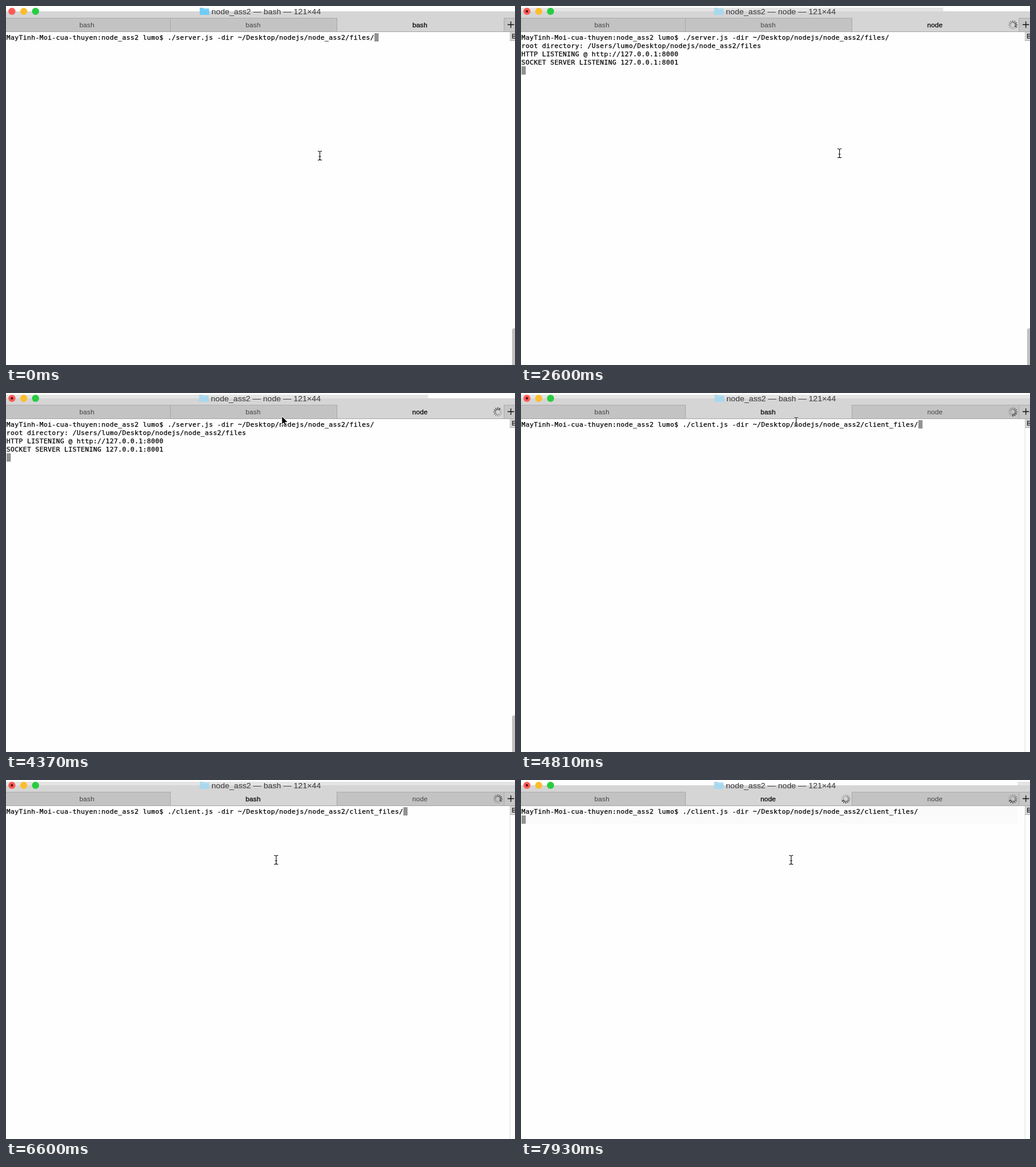
These frames come from a looping animation (862x607 px, 8000 ms). An HTML page:

```html
<!DOCTYPE html>
<html lang="en">
<head>
<meta charset="utf-8">
<title>Terminal</title>
<style>
  html, body { margin: 0; width: 100%; height: 100%; overflow: hidden; background: #fefefe; }
  svg { display: block; width: 862px; height: 607px; }
  text { white-space: pre; }
  .mono { font: 11px "DejaVu Sans Mono", monospace; letter-spacing: .378px; stroke: #000; stroke-width: .25px; }
  .title { font: 13.5px "Liberation Sans", Arial, sans-serif; letter-spacing: .1px; fill: #444; stroke: #444; stroke-width: .15px; }
  .tab { font: 11.5px "Liberation Sans", Arial, sans-serif; letter-spacing: .1px; text-anchor: middle; }
</style>
</head>
<body>
<svg id="stage" viewBox="0 0 862 607"></svg>
<script>
const LOOP = 8000, TICK = 148.3, START = 500;
const RUN_SERVER = 500, SERVER_TITLE = 650, SERVER_SPIN = 1100, SERVER_LOG = 1850;
const SWITCH = 4670, RUN_CLIENT = 7050, CLIENT_TITLE = 7200, CLIENT_SPIN = 7650;

const PROMPT = 'MayTinh-Moi-cua-thuyen:node_ass2 lumo$ ';
const SERVER_CMD = PROMPT + './server.js -dir ~/Desktop/nodejs/node_ass2/files/';
const CLIENT_CMD = PROMPT + './client.js -dir ~/Desktop/nodejs/node_ass2/client_files/';
const LOG = [
  'root directory: /Users/lumo/Desktop/nodejs/node_ass2/files',
  'HTTP LISTENING @ http://127.0.0.1:8000',
  'SOCKET SERVER LISTENING 127.0.0.1:8001'
];

// time, x, y of the pointer
const POINTER = [
  [2150, 531.5, 253], [2580, 539.5, 249], [3180, 541, 241.5],
  [3500, 538, 220], [4050, 480, 80], [4350, 467, 39],
  [4750, 467, 39], [5250, 457.5, 135]
];

const stage = document.getElementById('stage');

function add(tag, attrs, parent = stage) {
  const node = document.createElementNS('http://www.w3.org/2000/svg', tag);
  for (const key in attrs) node.setAttribute(key, attrs[key]);
  parent.appendChild(node);
  return node;
}
const rect = (x, y, width, height, fill, parent) => add('rect', { x, y, width, height, fill }, parent);
const set = (node, attrs) => { for (const key in attrs) node.setAttribute(key, attrs[key]); };
const show = (node, on) => node.setAttribute('visibility', on ? 'visible' : 'hidden');
const write = (node, text) => { if (node.textContent !== text) node.textContent = text; };
const move = (node, x, y) => node.setAttribute('transform', `translate(${x} ${y})`);

// Title bar
rect(0, 0, 862, 607, '#fefefe');
rect(0, 9, 862, 11, '#d5d5d5');
const sheen = rect(0, 3, 862, 6, '#e4e4e4');
['#fc5b55', '#fdbd2f', '#27cd41'].forEach((fill, i) =>
  add('circle', { cx: 10 + 20 * i, cy: 9, r: 6, fill }));
const busyDot = add('circle', { cx: 10, cy: 9, r: 2, fill: '#4a0808' });
const folder = add('g', {});
const folderBack = add('path', { d: 'M0 4V3.8Q0 3 .8 3H5.5L7 4.3H15.2Q16 4.3 16 5V14.4Q16 15 15.2 15H.8Q0 15 0 14.4Z' }, folder);
rect(0, 5.6, 16, .8, '#fff', folder).setAttribute('opacity', .25);
const title = add('text', { y: 14, class: 'title' });

// Tabs
const tabs = [[0, 278, 137], [279, 281, 418.5], [561, 282, 701]].map(([x, w, cx]) => ({
  bg: rect(x, 20, w, 23, '#c3c3c3'),
  edge: rect(x, 20, w, 1, '#acacac'),
  label: add('text', { x: cx, y: 36, class: 'tab' })
}));
rect(844, 20, 18, 23, '#c6c6c6');
rect(844, 20, 18, 1, '#acacac');
[278, 560, 843].forEach(x => rect(x, 20, 1, 23, '#a8a8a8'));
rect(0, 43, 862, 1, '#a6a6a6');
add('path', { d: 'M849.5 31.5H860.5M855 26V37', stroke: '#111', 'stroke-width': 1.3 });

function makeSpinner(x) {
  const group = add('g', { stroke: '#262626', 'stroke-width': 1.5, 'stroke-linecap': 'round' });
  move(group, x, 32);
  const spokes = Array.from({ length: 12 }, (_, i) =>
    add('path', { d: 'M0 -4V-7.2', transform: `rotate(${i * 30})` }, group));
  return { group, spokes };
}
const spinners = [makeSpinner(550), makeSpinner(833)];

// Terminal area
const band = rect(0, 44, 841, 30, '#fafafa');
const caret = rect(0, 0, 7, 14, '#929292');
const lines = [0, 1, 2, 3].map(i => add('text', { x: .7, y: 57 + 14 * i, class: 'mono' }));
const track = rect(853, 59, 1, 548, '#e2e2e2');
const thumb = add('rect', { x: 857, y: 545, width: 12, height: 70, rx: 3.5, fill: '#c1c1c1' });
rect(853, 44, 9, 15, '#d3d3d3');
rect(853, 58, 9, 1, '#b0b0b0');
add('path', { d: 'M863 47.7H857.7V54.3H863M858 51H863', fill: 'none', stroke: '#2b2b2b', 'stroke-width': 1.3 });

// Pointers
const beam = add('g', { fill: 'none' });
[['#fff', 2.6], ['#111', 1.1]].forEach(([stroke, width]) => add('path', {
  d: 'M-3.5 -7.5H-2Q0 -7.5 0 -5.5Q0 -7.5 2 -7.5H3.5M0 -5.5V5.5M-3.5 7.5H-2Q0 7.5 0 5.5Q0 7.5 2 7.5H3.5M-1.8 1.5H1.8',
  stroke, 'stroke-width': width
}, beam));
const arrow = add('path', {
  d: 'M0 0V14.5L3.3 11.4L5.7 16.8L8.2 15.7L5.9 10.5H10.5Z',
  fill: '#000', stroke: '#fff', 'stroke-width': 1
});

function pointerAt(t) {
  if (t <= POINTER[0][0]) return POINTER[0].slice(1);
  for (let i = 1; i < POINTER.length; i++) {
    const [t0, x0, y0] = POINTER[i - 1], [t1, x1, y1] = POINTER[i];
    if (t < t1) {
      const k = (t - t0) / (t1 - t0);
      return [x0 + (x1 - x0) * k, y0 + (y1 - y0) * k];
    }
  }
  return POINTER[POINTER.length - 1].slice(1);
}

function drawChrome(t, client) {
  const serverOn = t >= SERVER_TITLE, clientOn = t >= CLIENT_TITLE;
  const nodeTitle = client ? clientOn : serverOn;
  const left = nodeTitle ? 347 : 348;
  write(title, `node_ass2 — ${nodeTitle ? 'node' : 'bash'} — 121×44`);
  title.setAttribute('x', left);
  move(folder, left - 20, 0);
  folderBack.setAttribute('fill', serverOn ? '#a8d8ee' : '#70cbf8');
  show(busyDot, serverOn);

  show(sheen, serverOn);
  if (clientOn) set(sheen, { x: 841, width: 21 });
  else set(sheen, { x: 0, width: client ? 862 : 715 });

  const active = client ? 1 : 2;
  const names = ['bash', clientOn ? 'node' : 'bash', serverOn ? 'node' : 'bash'];
  tabs.forEach((tab, i) => {
    const on = i === active;
    tab.bg.setAttribute('fill', on ? '#d5d5d5' : '#c3c3c3');
    show(tab.edge, !on);
    write(tab.label, names[i]);
    set(tab.label, { fill: on ? '#000' : '#444', stroke: on ? '#000' : 'none', 'stroke-width': .25 });
  });
}

function drawSpinners(t, sampled) {
  const head = Math.floor((112 + 360 * (sampled - 1550) / 1000) / 30);
  const active = [t >= CLIENT_SPIN, t >= SERVER_SPIN];
  spinners.forEach(({ group, spokes }, i) => {
    show(group, active[i]);
    spokes.forEach((spoke, j) => {
      const age = (((head - j) % 12) + 12) % 12;
      spoke.setAttribute('opacity', Math.max(.22, .95 - age * .085));
    });
  });
}

function drawTerminal(t, client) {
  const running = t >= (client ? RUN_CLIENT : RUN_SERVER);
  const text = [client ? CLIENT_CMD : SERVER_CMD];
  if (!client && t >= SERVER_LOG) text.push(...LOG);
  lines.forEach((line, i) => write(line, text[i] || ''));
  set(caret, running
    ? { x: 1, y: 46 + 14 * text.length }
    : { x: 1 + 7 * text[0].length, y: 46 });
  show(band, client && running);
  show(track, client);
  show(thumb, !client);
}

function drawPointer(sampled) {
  const [x, y] = pointerAt(sampled);
  const overTabs = y < 44;
  show(arrow, overTabs);
  show(beam, !overTabs);
  move(overTabs ? arrow : beam, x, y);
}

function draw(t) {
  const client = t >= SWITCH;
  const sampled = t < START ? 0 : START + Math.floor((t - START) / TICK) * TICK;
  drawChrome(t, client);
  drawSpinners(t, sampled);
  drawTerminal(t, client);
  drawPointer(sampled);
}

const origin = performance.now();
function frame() {
  draw((performance.now() - origin) % LOOP);
  requestAnimationFrame(frame);
}
frame();
</script>
</body>
</html>
```
